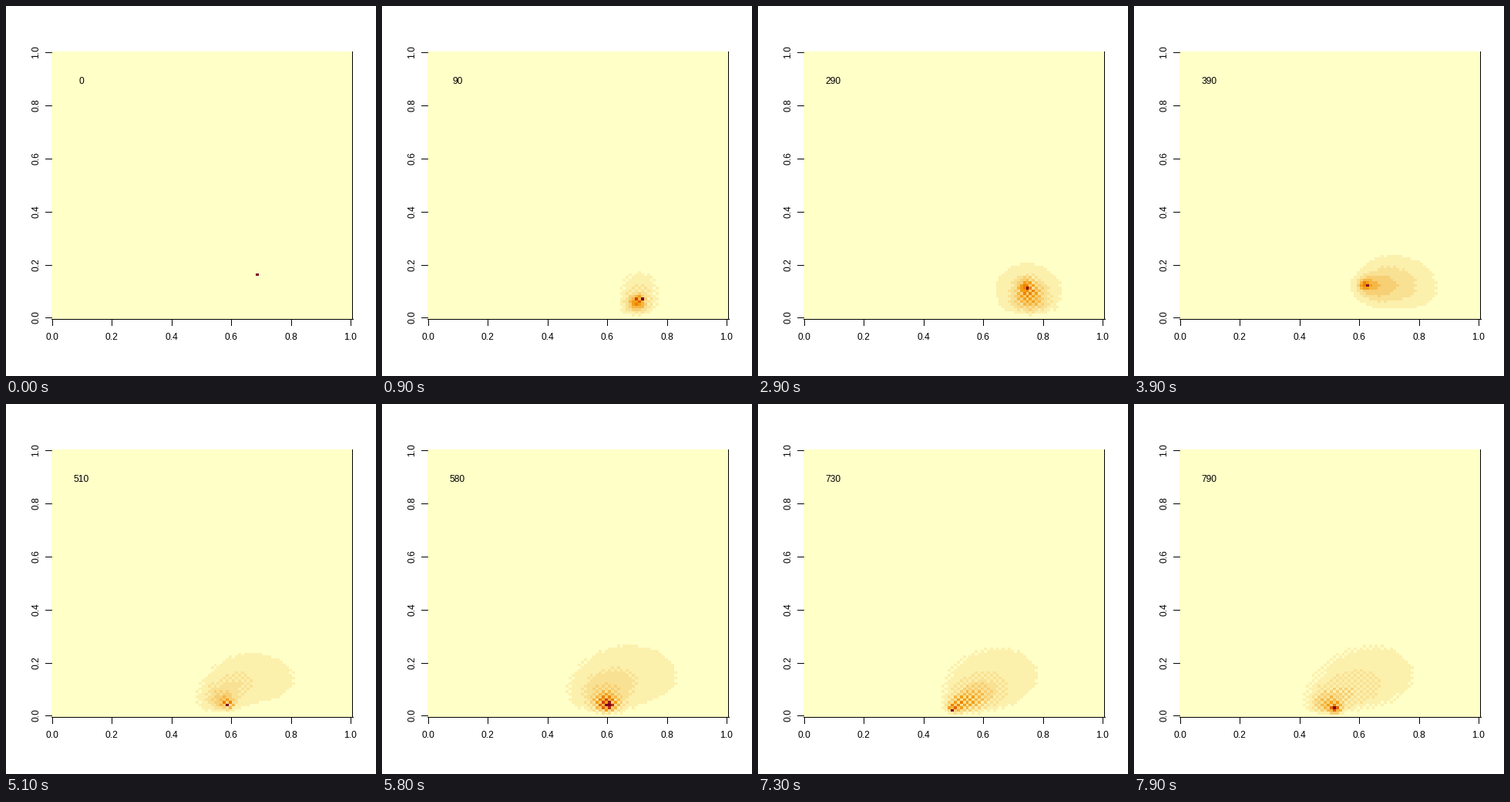
These frames come from a looping animation (480 by 480 pixels, 8 s). A matplotlib script:

```python
import random

import matplotlib.pyplot as plt
import numpy as np
from matplotlib.animation import FuncAnimation
from matplotlib.colors import LinearSegmentedColormap

SIZE, DPI = 480, 100
FRAMES, INTERVAL, STEPS = 80, 100, 10
GRID = 100
LEFT, RIGHT, TOP, BOTTOM = 59, 449, 59, 406

HEAT = LinearSegmentedColormap.from_list(
    "heat", ["#FFFFC8", "#F8D680", "#F39300", "#D43E00", "#7D0025"], N=12)

# (step, column, row) turning points of the walker
STOPS = [
    (0, 68, 16), (50, 70, 6), (180, 78, 9), (290, 74, 11), (390, 62, 12),
    (470, 52, 6), (510, 58, 4), (660, 57, 5), (790, 51, 3),
]


def bridge(n, dx, dy, rng):
    """Shuffled unit moves and rests that add up to (dx, dy) in n steps."""
    moves = [(int(np.sign(dx)), 0)] * abs(dx) + [(0, int(np.sign(dy)))] * abs(dy)
    pairs = (n - len(moves)) // 6
    moves += [(1, 0), (-1, 0), (0, 1), (0, -1)] * pairs
    moves += [(0, 0)] * (n - len(moves))
    rng.shuffle(moves)
    return moves


def walk(floor=2):
    """Random walk through the stops, reflected at the floor."""
    rng = random.Random(7)
    x, y = STOPS[0][1:]
    yield x, y
    for (t0, x0, y0), (t1, x1, y1) in zip(STOPS, STOPS[1:]):
        for dx, dy in bridge(t1 - t0, x1 - x0, y1 - y0, rng):
            x, y = x + dx, y + dy
            yield x, floor + abs(y - floor)


def simulate():
    """Heat spreads to the four neighbours; the edges stay cold."""
    heat = np.zeros((GRID, GRID))
    shots = []
    for step, (x, y) in enumerate(walk()):
        spread = np.zeros_like(heat)
        spread[1:-1, 1:-1] = (heat[:-2, 1:-1] + heat[2:, 1:-1]
                              + heat[1:-1, :-2] + heat[1:-1, 2:]) / 4
        heat = spread
        heat[y, x] += 1
        if step % STEPS == 0:
            shots.append(heat / heat.max())
    return shots


plt.rcParams["font.family"] = "Liberation Sans"
plt.rcParams["font.size"] = 12 * 72 / DPI

fig = plt.figure(figsize=(SIZE / DPI, SIZE / DPI), dpi=DPI, facecolor="white")
ax = fig.add_axes([0, 0, 1, 1])
ax.axis("off")

shots = simulate()
image = ax.imshow(shots[0], cmap=HEAT, vmin=0, vmax=1, origin="lower",
                  extent=(LEFT, RIGHT, BOTTOM, TOP), aspect="auto",
                  interpolation="nearest")
ax.set_xlim(0, SIZE)
ax.set_ylim(SIZE, 0)


def line(xs, ys):
    ax.plot(xs, ys, color="black", lw=72 / DPI, antialiased=False,
            solid_capstyle="butt")


def text(x, y, s, **style):
    return ax.text(x, y, s, ha="center", va="baseline", **style)


line([LEFT, RIGHT + 0.5], [BOTTOM, BOTTOM])
line([RIGHT, RIGHT], [TOP, BOTTOM])
for v in np.linspace(0, 1, 6):
    x, y = round(60 + 387 * v), round(404.4 - 344.4 * v)
    line([x, x], [BOTTOM, BOTTOM + 8])
    line([LEFT - 8, LEFT], [y, y])
    text(x - 0.5, 433, f"{v:.1f}")
    text(42.6, y - 0.5, f"{v:.1f}", rotation=90, rotation_mode="anchor")

label = text(97.8, 101, "0")


def update(i):
    image.set_data(shots[i])
    label.set_text(str(i * STEPS))
    return image, label


anim = FuncAnimation(fig, update, frames=FRAMES, interval=INTERVAL,
                     repeat=True, repeat_delay=0)
plt.show()
```
